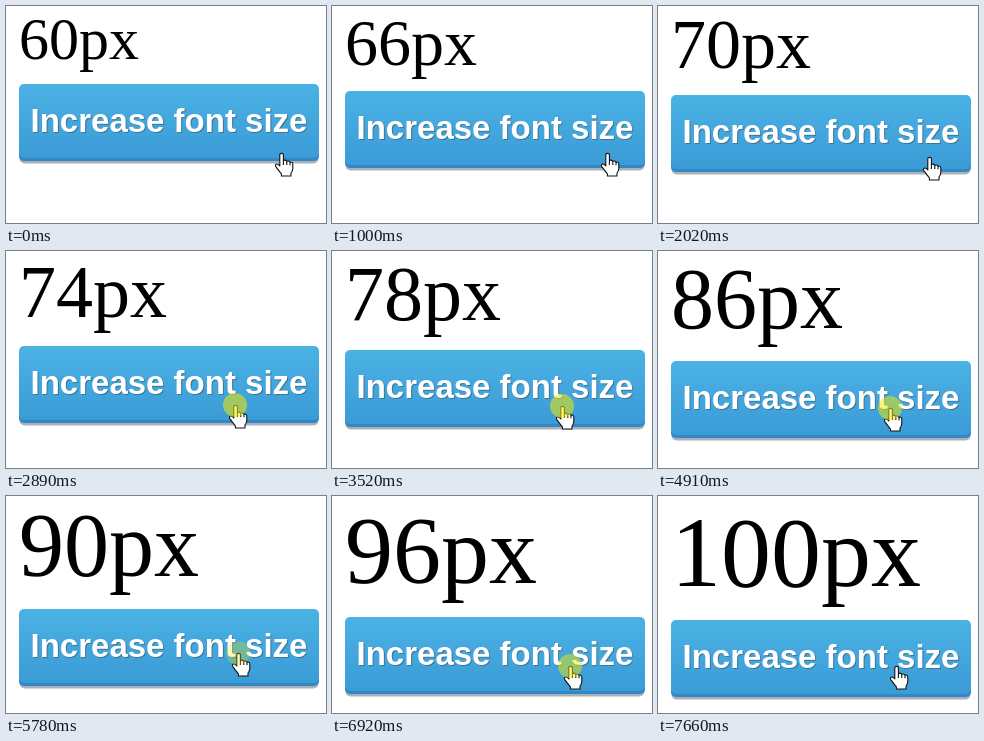
An HTML page that plays this animation: 320x217 px, repeating every 7.8 s.

```html
<!DOCTYPE html>
<html lang="en">
<head>
<meta charset="utf-8">
<title>Increase font size</title>
<style>
  html, body { margin: 0; width: 100%; height: 100%; overflow: hidden; background: #fff; }
  svg { display: block; width: 100%; height: 100%; }
  #size { font-family: "Liberation Serif", "Times New Roman", serif; }
  .label { font: bold 33px "Liberation Sans", Arial, sans-serif; text-anchor: middle; }
</style>
</head>
<body>
<svg viewBox="0 0 320 217">
  <defs>
    <linearGradient id="face" x1="0" y1="0" x2="0" y2="1">
      <stop offset="0" stop-color="#4bb2e4"/>
      <stop offset="1" stop-color="#3b9bd6"/>
    </linearGradient>
    <filter id="soft" x="-5%" y="-10%" width="110%" height="120%">
      <feGaussianBlur stdDeviation=".5"/>
    </filter>
  </defs>
  <text id="size" x="13"></text>
  <g id="button">
    <rect x="13.5" y="4" width="299" height="75.5" rx="5" fill="#adb0b6" filter="url(#soft)"/>
    <rect x="13" y="4" width="300" height="73" rx="5" fill="#3088c6"/>
    <rect x="13" width="300" height="74" rx="5" fill="url(#face)"/>
    <text class="label" x="164" y="49" fill="#3c4650" fill-opacity=".5">Increase font size</text>
    <text class="label" x="163" y="48" fill="#fff">Increase font size</text>
  </g>
  <path id="hand" fill="#fff" stroke="#111" stroke-width="1.1" stroke-linejoin="round"
    d="M-2.2 13V1.8Q-2.2 .4-.4 .4Q1.4 .4 1.4 1.8V7.5Q3.2 6.4 4.8 8.3Q6.8 7.4 8 9.2Q10.8 8.6 10.8 11.2V15.5Q10.6 18 9 20V23H-.6V20.8Q-3.4 17.6-6.2 13.6Q-7.2 11.6-5.4 11Q-3.8 10.8-2.2 13ZM1.4 7.5V12M4.8 8.3V12M8 9.2V12.2"/>
  <circle id="dot" cx="-1" r="12" fill="#f0eb00"/>
</svg>
<script>
const LOOP = 7800, STEP = 125.25, FIRST = 270;
const START = 60, GROW = 2;
const HOLD = 200, FADE = 80;

// Release time of each click; every click adds 2px.
const clicks = [470, 720, 1000, 1260, 1500, 2290, 2640, 3010, 3260, 3640,
  4020, 4270, 4660, 5030, 5420, 5940, 6410, 6670, 7040, 7650];
// The pointer as [time, x, y].
const path = [[0, 276, 147], [1520, 276, 147], [1760, 272, 151], [2020, 272, 151],
  [2770, 230, 154], [3400, 230, 154], [4020, 233, 157], [6280, 233, 157],
  [6780, 239, 170], [LOOP, 239, 170]];

const $ = id => document.getElementById(id);
const size = $('size'), button = $('button'), dot = $('dot'), hand = $('hand');
const move = (el, x, y) => el.setAttribute('transform', `translate(${x} ${y})`);

function refresh(t) {
  const k = Math.floor((t - FIRST) / STEP + 0.2);
  return k < 0 ? 0 : FIRST + k * STEP;
}

function pointer(t) {
  const i = Math.max(1, path.findIndex(p => p[0] >= t));
  const [t0, x0, y0] = path[i - 1], [t1, x1, y1] = path[i];
  const u = (t - t0) / (t1 - t0);
  return [Math.round(x0 + (x1 - x0) * u), Math.round(y0 + (y1 - y0) * u)];
}

// How far the current press has faded in, 0 to 1.
function press(t) {
  const next = clicks.find(c => c > t);
  if (next === undefined) return 0;
  return Math.min(1, Math.max(0, (t - next + HOLD) / FADE));
}

function draw(time) {
  const t = refresh(time);
  const px = START + GROW * clicks.filter(c => c <= t).length;
  const down = press(t);
  const ascent = Math.round(0.891 * px);
  const line = ascent + Math.round(0.216 * px) + Math.round(0.042 * px);
  const [x, y] = pointer(t);

  size.textContent = px + 'px';
  size.setAttribute('font-size', px);
  size.setAttribute('y', ascent + Math.floor(0.021 * px) - 1);
  move(button, 0, line + 9 + (down > 0.3 ? 1 : 0));
  dot.setAttribute('opacity', 0.55 * down);
  move(dot, x, y);
  move(hand, x, y);
}

const start = performance.now();
function tick() {
  draw((performance.now() - start) % LOOP);
  requestAnimationFrame(tick);
}
tick();
</script>
</body>
</html>
```
